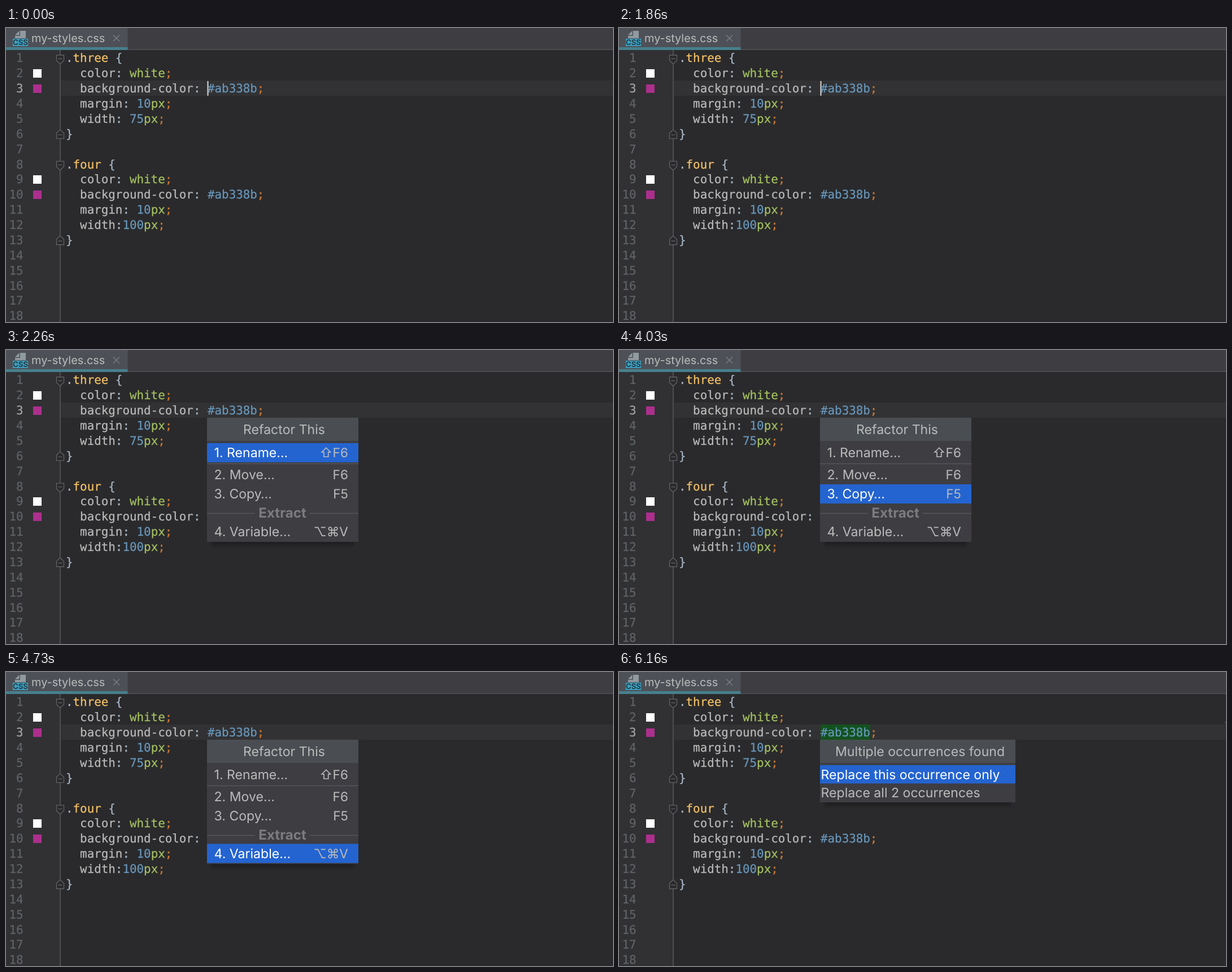
Animation of 1075x521 px, one loop 8000 ms. Source, as an HTML page:

```html
<!DOCTYPE html>
<html lang="en">
<head>
<meta charset="utf-8">
<title>Refactor menu</title>
<style>
html, body { margin: 0; width: 100%; height: 100%; overflow: hidden; background: #2a2a2c; }
svg { display: block; width: 1075px; height: 521px; text-rendering: geometricPrecision; }
text { white-space: pre; }
.code text { font: 20.85px "DejaVu Sans Mono", monospace; color: #a9b7c6; }
.code text, .code tspan { fill: currentColor; stroke: currentColor; stroke-width: .25; }
.code .num { color: #606366; text-anchor: end; }
.code .current { color: #a4a3a3; }
.sel { color: #f5c266; }
.prop { color: #bababa; }
.val { color: #a5c261; }
.lit { color: #6897bb; }
.semi { color: #cc7832; }
.fold { fill: #2a2a2c; stroke: #606063; stroke-width: 1.4; }
.ui text { font: 23.1px Inter, sans-serif; font-optical-sizing: none; fill: #bbb; }
.ui .tab { font-size: 19.9px; }
.ui .badge { font-size: 13.2px; font-weight: 600; fill: #20343d; text-anchor: middle; }
.ui .title { text-anchor: middle; }
.ui .key { font-size: 22.7px; text-anchor: end; }
.ui .group { font-size: 24.2px; font-weight: 700; fill: #7c7c80; text-anchor: middle; }
.ui .label { fill: currentColor; }
.shadow { fill: rgba(0, 0, 0, .22); filter: blur(2px); }
.panel { fill: #3e3d42; }
.head { fill: #4a4e53; }
.rule { stroke: #56565a; stroke-width: 1.4; }
.row { color: #bbb; fill: transparent; }
.chosen { color: #fff; fill: #2464d0; }

.caret, .menu, .dialog, .row { animation: 8s step-end infinite; }
.caret { animation-name: blink; }
.menu { animation-name: menu; }
.dialog { animation-name: dialog; }
.row1 { animation-name: pick1; }
.row2 { animation-name: pick2; }
.row3 { animation-name: pick3; }
.row4 { animation-name: pick4; }
@keyframes blink {
  0%, 10.75%, 23.25% { opacity: 1; }
  4.5%, 17%, 28.25%, 100% { opacity: 0; }
}
@keyframes menu { 0%, 76.625%, 100% { opacity: 0; } 28.25% { opacity: 1; } }
@keyframes dialog { 0% { opacity: 0; } 77%, 100% { opacity: 1; } }
@keyframes pick1 { 28.25% { color: #fff; fill: #2464d0; } 43.75% { color: #bbb; fill: transparent; } }
@keyframes pick2 { 43.75% { color: #fff; fill: #2464d0; } 50.375% { color: #bbb; fill: transparent; } }
@keyframes pick3 { 50.375% { color: #fff; fill: #2464d0; } 59.125% { color: #bbb; fill: transparent; } }
@keyframes pick4 { 59.125% { color: #fff; fill: #2464d0; } 76.625% { color: #bbb; fill: transparent; } }
</style>
</head>
<body>
<svg viewBox="0 0 1075 521">
  <rect width="1075" height="521" fill="#2a2a2c"/>
  <rect y="39" width="96" height="482" fill="#313134"/>
  <rect x="97" y="93" width="978" height="27" fill="#323234"/>
  <path d="M96 39V521" stroke="#57575a" stroke-width="1.6"/>

  <g class="ui">
    <rect width="1075" height="38" fill="#3e3d42"/>
    <rect y="37.5" width="1075" height="1.5" fill="#515155"/>
    <rect width="215.5" height="34" fill="#4d5157"/>
    <rect y="34" width="215.5" height="5" fill="#477f8c"/>
    <path d="M16 12.5L23.5 5V12.5ZM25 5H35V18H16V14H25Z" fill="#919aa1"/>
    <rect x="12" y="19" width="27" height="13" fill="#3d9dbd"/>
    <text class="badge" x="25.5" y="30.2">CSS</text>
    <text class="tab" x="45" y="25">my-styles.css</text>
    <path d="M190 12.5L201 23.5M201 12.5L190 23.5" stroke="#7b7e82" stroke-width="1.4"/>
  </g>

  <g class="dialog">
    <rect x="357" y="93" width="88" height="27" fill="#14521f"/>
    <rect x="1073.5" y="88" width="1.5" height="3" fill="#2f6b3a"/>
  </g>
  <g class="code" id="code"></g>
  <rect class="caret" x="356.4" y="94" width="2.2" height="26" fill="#ccc"/>

  <g class="ui menu">
    <rect class="shadow" x="364" y="330" width="252" height="17"/>
    <rect class="panel" x="356" y="120" width="268" height="220"/>
    <rect class="head" x="356" y="120" width="268" height="41"/>
    <path class="rule" d="M356 201.5H624M356 289.5H441M537 289.5H624"/>
    <text class="title" x="492.5" y="148.5">Refactor This</text>
    <text class="group" x="489.5" y="297">Extract</text>
    <g id="rows"></g>
  </g>

  <g class="ui dialog">
    <rect class="shadow" x="364" y="221" width="330" height="17"/>
    <rect class="panel" x="356" y="120" width="346" height="111"/>
    <rect class="head" x="356" y="120" width="346" height="41"/>
    <text class="title" x="533" y="148.5">Multiple occurrences found</text>
    <g class="chosen">
      <rect x="356" y="165" width="346" height="32.5"/>
      <text class="label" x="357.5" y="189.8">Replace this occurrence only</text>
    </g>
    <text x="357.5" y="222">Replace all 2 occurrences</text>
  </g>
</svg>
<script>
const PITCH = 26.88, LEFT = 106, FIRST_BASELINE = 60.4;
const span = (cls, text) => `<tspan class="${cls}">${text}</tspan>`;
const semi = span('semi', ';');
const rule = (name, gap, ...value) => '  ' + span('prop', name) + ':' + gap + value.join('') + semi;
const size = (name, gap, n) => rule(name, gap, span('lit', n), span('val', 'px'));
const block = (name, width) => [
  '.' + span('sel', name) + ' {',
  rule('color', ' ', span('val', 'white')),
  rule('background-color', ' ', span('lit', '#ab338b')),
  size('margin', ' ', 10),
  width,
  '}'
];
const lines = [
  ...block('three', size('width', ' ', 75)), '',
  ...block('four', size('width', '', 100))
];

const swatch = (line, color) =>
  `<rect x="48" y="${Math.round(73 + (line - 2) * PITCH)}" width="15" height="15" fill="${color}"/>`;
const fold = (line, flip) =>
  `<path class="fold" transform="translate(96 ${55.5 + (line - 1) * PITCH - (flip ? 1.5 : 0)}) scale(1 ${flip ? -1 : 1})"
    d="M-6.5 -7.5H6.5V2L0 8.3L-6.5 2ZM-3.5 -1H3.5"/>`;

let code = '';
for (let i = 0; i < 18; i++) {
  const y = FIRST_BASELINE + i * PITCH;
  code += `<text class="num${i === 2 ? ' current' : ''}" x="30.5" y="${y}">${i + 1}</text>`;
  if (lines[i]) code += `<text x="${LEFT}" y="${y}">${lines[i]}</text>`;
}
for (const top of [1, 8]) {
  code += swatch(top + 1, '#fff') + swatch(top + 2, '#ac2f8d') + fold(top) + fold(top + 5, true);
}
document.getElementById('code').innerHTML = code;

const items = [
  ['1. Rename…', '⇧F6', 165],
  ['2. Move…', 'F6', 204],
  ['3. Copy…', 'F5', 238],
  ['4. Variable…', '⌥⌘V', 304.5]
];
document.getElementById('rows').innerHTML = items.map(([label, key, y], i) =>
  `<g class="row row${i + 1}"><rect x="356" y="${y}" width="268" height="34"/>
    <text class="label" x="368.5" y="${y + 25}">${label}</text>
    <text class="key" x="606" y="${y + 25}">${key}</text></g>`).join('');
</script>
</body>
</html>
```
